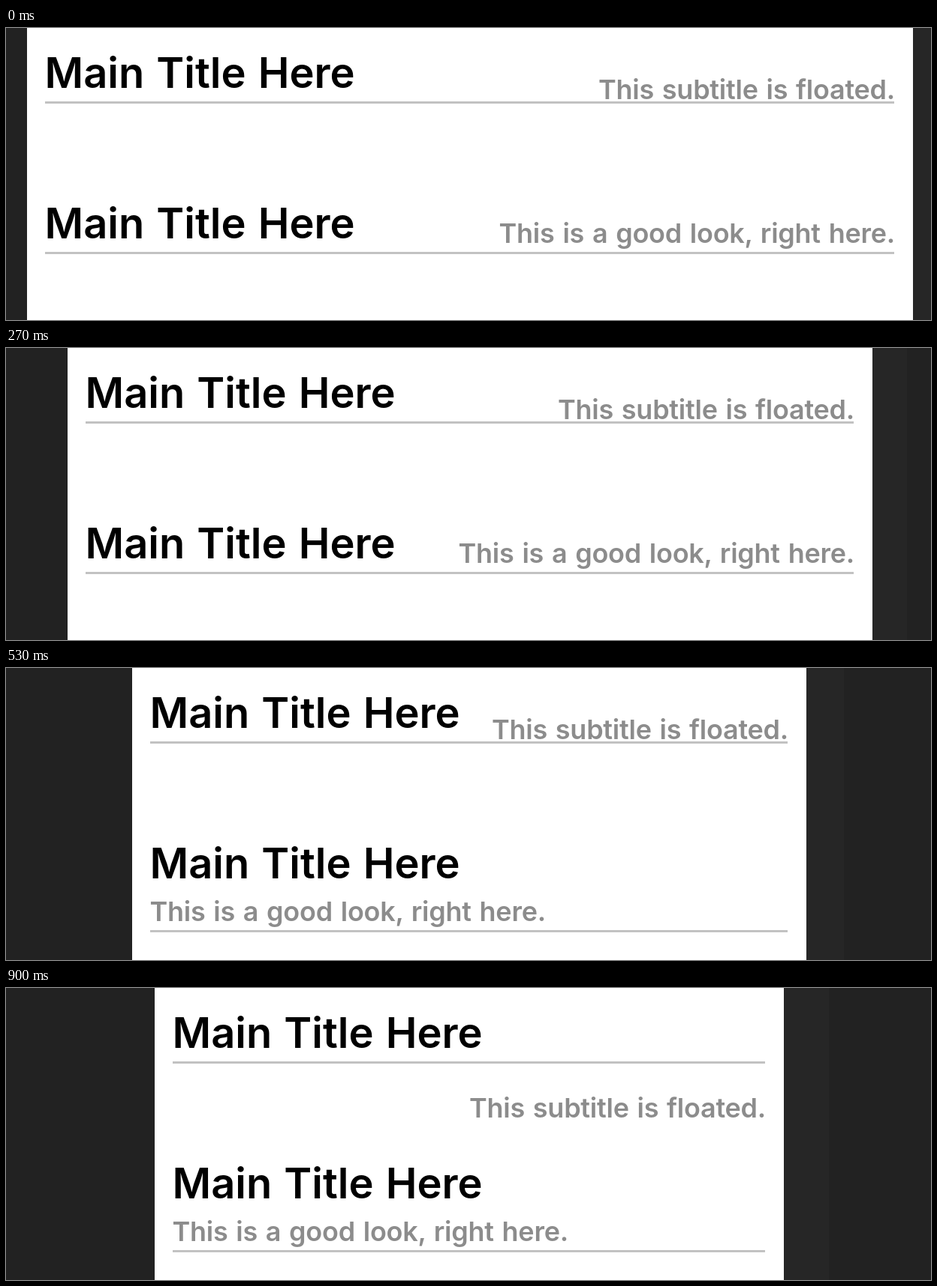
Recreate the animation shown at these times as an HTML page. Size 1232x390 px, loop 0.93 s.

```html
<!DOCTYPE html>
<html lang="en">
<head>
<meta charset="utf-8">
<title>Title and subtitle wrapping</title>
<style>
  html, body { margin: 0; width: 100%; height: 100%; overflow: hidden; background: #222; }
  svg { display: block; width: 100%; height: 100%; }
  text { font-family: Inter, "Liberation Sans", sans-serif; font-weight: 600; word-spacing: 2px; }
  .title { font-size: 56px; fill: #000; }
  .sub { font-size: 36px; fill: #8c8c8c; letter-spacing: -0.25px; }
  .rule { fill: #c2c2c2; }
</style>
</head>
<body>
<svg viewBox="0 0 1232 390">
  <rect id="gutter" height="390" fill="#262626"/>
  <rect id="page" height="390" fill="#fff"/>
  <rect id="rule1" class="rule" y="98" height="3"/>
  <rect id="rule2" class="rule" height="3"/>
  <text id="title1" class="title" y="80">Main Title Here</text>
  <text id="title2" class="title" y="281">Main Title Here</text>
  <text id="sub1" class="sub" text-anchor="end">This subtitle is floated.</text>
  <text id="sub2" class="sub">This is a good look, right here.</text>
</svg>
<script>
const LOOP = 930;
const FRAME = 100 / 3;
// Page width in half-scale pixels, and width of the lighter gutter beside it
const widthKeys = [[33, 590], [133, 581], [267, 536], [367, 491], [533, 449], [567, 434], [667, 419]];
const gutterKeys = [[267, 46], [367, 56], [533, 50], [667, 60]];

const set = (id, attrs) => {
  const el = document.getElementById(id);
  for (const name in attrs) el.setAttribute(name, attrs[name]);
};

// Smooth curve through the keys that never overshoots them
function sample(keys, t) {
  const last = keys.length - 1;
  if (t <= keys[0][0]) return keys[0][1];
  if (t >= keys[last][0]) return keys[last][1];
  const slope = i => (keys[i + 1][1] - keys[i][1]) / (keys[i + 1][0] - keys[i][0]);
  const tangent = i => {
    if (i === 0 || i === last) return 0;
    const a = slope(i - 1), b = slope(i);
    return a * b > 0 ? 2 * a * b / (a + b) : 0;
  };
  const i = keys.findIndex(k => k[0] > t) - 1;
  const [t0, v0] = keys[i], [t1, v1] = keys[i + 1];
  const span = t1 - t0, u = (t - t0) / span, w = 1 - u;
  return v0 * (1 + 2 * u) * w * w + v1 * (3 - 2 * u) * u * u
    + span * u * w * (tangent(i) * w - tangent(i + 1) * u);
}

function draw(now) {
  // Thirty pictures a second, each starting on a 10 ms tick
  const tick = Math.floor((now % LOOP) / 10);
  const t = Math.floor(tick * 0.3 + 0.15) * FRAME;

  const half = Math.round(sample(widthKeys, t));
  const left = 2 * Math.floor((618 - half) / 2);
  const width = 2 * half;
  const right = left + width;
  const inner = width - 49;
  const floatWraps = inner < 802;
  const flexWraps = inner < 935;

  set("gutter", { x: right, width: Math.round(sample(gutterKeys, t)) });
  set("page", { x: left, width });
  set("rule1", { x: left + 24, width: inner });
  set("rule2", { x: left + 24, width: inner, y: flexWraps ? 350 : 299 });
  set("title1", { x: left + 23.5 });
  set("title2", { x: left + 23.5 });
  set("sub1", { x: right - 24, y: floatWraps ? 173 : 95 });
  set("sub2", flexWraps
    ? { x: left + 23.5, y: 338, "text-anchor": "start" }
    : { x: right - 24, y: 287, "text-anchor": "end" });
}

const start = performance.now();
function loop() {
  draw(performance.now() - start);
  requestAnimationFrame(loop);
}
loop();
</script>
</body>
</html>
```
